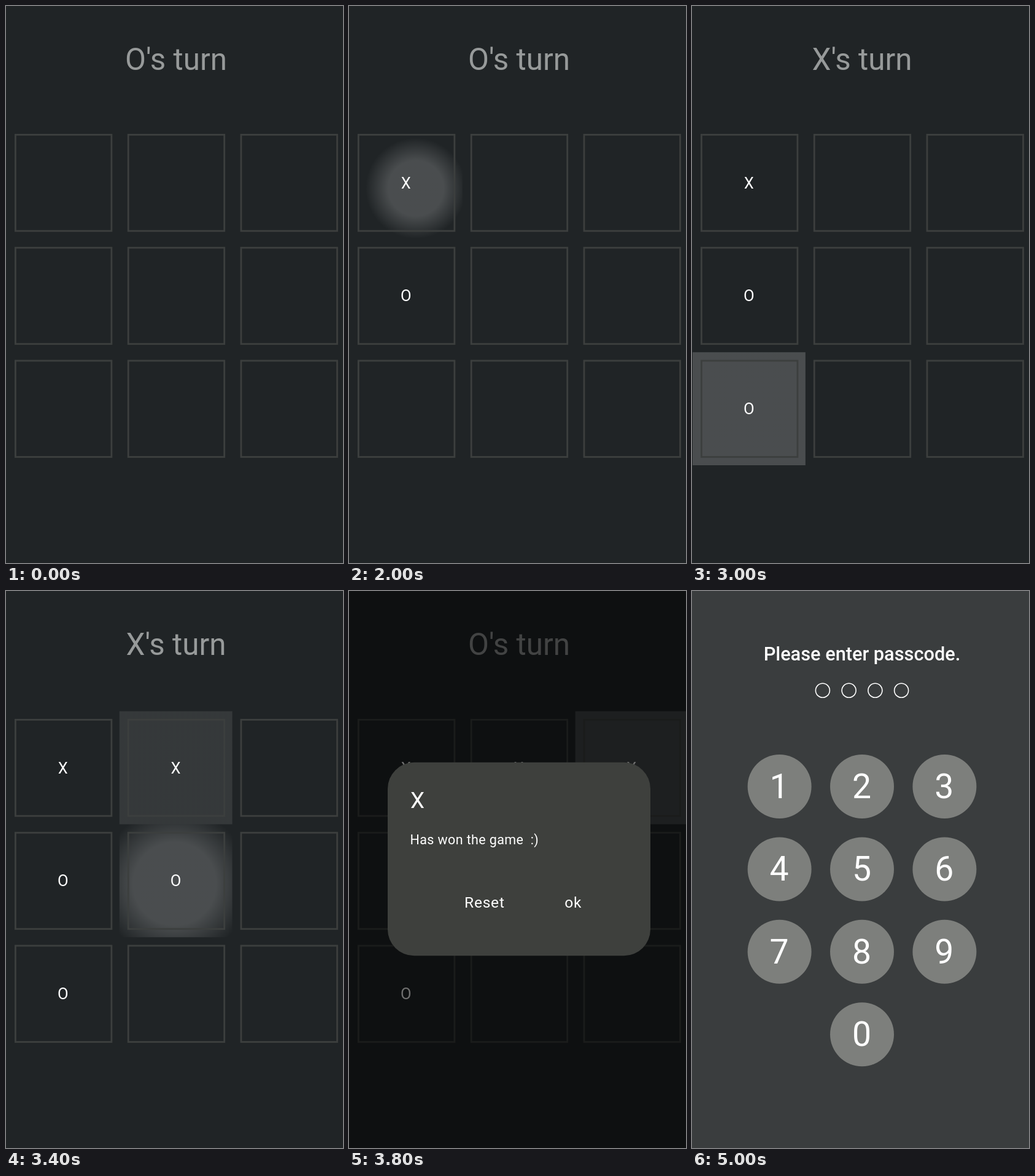
An HTML page with a canvas that plays this animation: 549 by 906 pixels, repeating every 5700 ms.

```html
<!DOCTYPE html>
<html lang="en">
<head>
<meta charset="utf-8">
<title>Tic-tac-toe</title>
<style>
  html, body { margin: 0; width: 100%; height: 100%; overflow: hidden; background: #202426; }
  canvas { display: block; }
</style>
</head>
<body>
<canvas id="stage" width="549" height="906"></canvas>
<script>
const ctx = document.getElementById('stage').getContext('2d');
const W = 549, H = 906, LOOP = 5700, STEP = 100;
const MID = 277, GRID_X = 1, GRID_Y = 195.6, CELL = 183.8;
const DIALOG_AT = 3645, LOCK_AT = 4200;

// Each tap: time, column, row, mark, and touch point relative to the cell centre
const taps = [
  { at: 845,  col: 0, row: 1, mark: 'O', dx: 5,  dy: 5 },
  { at: 1960, col: 0, row: 0, mark: 'X', dx: 16, dy: 9 },
  { at: 2880, col: 0, row: 2, mark: 'O', dx: 5,  dy: 5 },
  { at: 3180, col: 1, row: 0, mark: 'X', dx: 0,  dy: 5 },
  { at: 3340, col: 1, row: 1, mark: 'O', dx: -2, dy: 5 },
  { at: 3645, col: 2, row: 0, mark: 'X', dx: 0,  dy: 5 }
];

const clamp = v => Math.min(1, Math.max(0, v));
const easeOut = p => 1 - (1 - p) ** 2;

function text(str, x, y, size, { color = '#fff', align = 'center', weight = 400, spacing = 0 } = {}) {
  ctx.font = `${weight} ${size}px Roboto, sans-serif`;
  ctx.letterSpacing = spacing + 'px';
  ctx.textAlign = align;
  ctx.fillStyle = color;
  ctx.fillText(str, x, y);
}

function fillStage(color) {
  ctx.fillStyle = color;
  ctx.fillRect(0, 0, W, H);
}

function circle(x, y, r) {
  ctx.beginPath();
  ctx.arc(x, y, r, 0, Math.PI * 2);
}

function drawRipple(tap, age) {
  const strength = 0.19 * clamp((320 - age) / 200);
  if (strength === 0) return;
  const left = GRID_X + tap.col * CELL, top = GRID_Y + tap.row * CELL;
  const x = left + CELL / 2 + tap.dx, y = top + CELL / 2 + tap.dy;
  const radius = Math.max(1, age * 2.05);
  const glow = ctx.createRadialGradient(x, y, radius * 0.55, x, y, radius);
  glow.addColorStop(0, `rgba(255,255,255,${strength})`);
  glow.addColorStop(1, 'rgba(255,255,255,0)');
  ctx.fillStyle = glow;
  ctx.fillRect(left, top, CELL, CELL);
}

function drawGame(t) {
  fillStage('#202426');
  const played = taps.filter(tap => t >= tap.at);
  const turn = played.length % 2 ? 'X' : 'O';
  text(`${turn}'s turn`, MID, 104, 49.4, { color: '#979a9a' });

  played.forEach(tap => drawRipple(tap, t - tap.at));

  ctx.strokeStyle = '#3c3f3e';
  ctx.lineWidth = 2.8;
  for (let i = 0; i < 9; i++) {
    ctx.strokeRect(15.4 + (i % 3) * CELL, 209.4 + Math.floor(i / 3) * CELL, 156.5, 156.5);
  }

  for (const { col, row, mark } of played) {
    text(mark, GRID_X + (col + 0.5) * CELL - 0.2, GRID_Y + (row + 0.5) * CELL + 9, 25.5);
  }
}

function drawDialog(opacity) {
  ctx.globalAlpha = opacity;
  fillStage('rgba(0,0,0,0.56)');
  ctx.fillStyle = '#3e403d';
  ctx.beginPath();
  ctx.roundRect(63, 278.8, 428, 314.5, 43);
  ctx.fill();
  text('X', 100, 353, 36.8, { align: 'left' });
  text('Has won the game\u00a0 :)', 99.5, 411.5, 21.5, { align: 'left', spacing: 0.38 });
  text('Reset', 188, 514.7, 24.56, { align: 'left', spacing: 0.77 });
  text('ok', 351.3, 514.7, 24.56, { align: 'left', spacing: 0.77 });
  ctx.globalAlpha = 1;
}

function drawLock(opacity) {
  ctx.globalAlpha = opacity;
  fillStage('#3a3d3e');
  text('Please enter passcode.', MID, 113, 30.7, { weight: 500 });

  ctx.strokeStyle = '#fff';
  ctx.lineWidth = 1.6;
  for (let i = 0; i < 4; i++) {
    circle(MID + (i - 1.5) * 42.75, 161.8, 11.5);
    ctx.stroke();
  }

  for (let digit = 0; digit < 10; digit++) {
    const slot = digit ? digit - 1 : 10;
    const x = MID + (slot % 3 - 1) * 134.4;
    const y = 318 + Math.floor(slot / 3) * 134.4;
    circle(x, y, 52);
    ctx.fillStyle = '#7d7f7c';
    ctx.fill();
    text(digit, x - 0.5, y + 19, 55.3);
  }
  ctx.globalAlpha = 1;
}

function render(t) {
  const dialog = easeOut(clamp((t - DIALOG_AT) / 150));
  const lock = clamp((t - LOCK_AT) / 400);
  if (lock < 1) {
    drawGame(t);
    if (dialog > 0) drawDialog(dialog);
  }
  if (lock > 0) drawLock(lock);
}

const start = performance.now();
function tick() {
  const elapsed = (performance.now() - start) % LOOP;
  render(Math.floor(elapsed / STEP) * STEP);
  requestAnimationFrame(tick);
}
tick();
</script>
</body>
</html>
```
